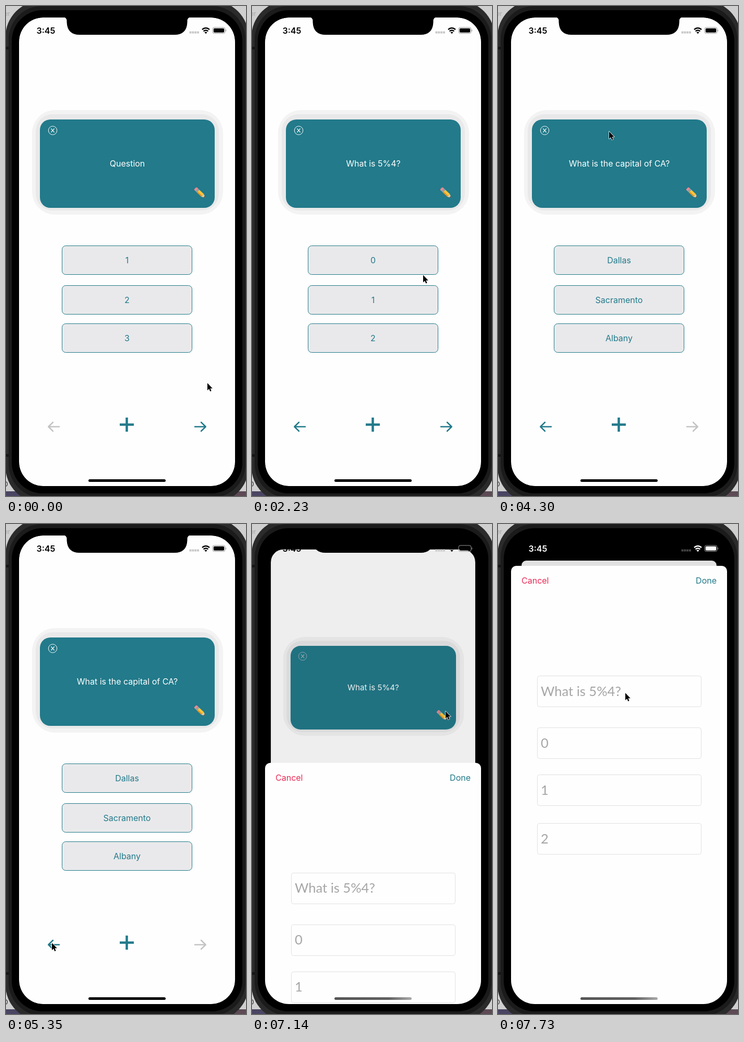
Animation, 460 px wide and 937 px high, one loop 8 s. Source, as an HTML page:

```html
<!DOCTYPE html>
<html lang="en">
<head>
<meta charset="utf-8">
<title>Flashcards</title>
<style>
  html, body { margin: 0; width: 100%; height: 100%; overflow: hidden; background: #cfcfcf; }
  svg { display: block; width: 100%; height: 100%; --teal: #227a8a; }
  text { font: 16px Inter, "Liberation Sans", sans-serif; }
  .mid { text-anchor: middle; }
  .teal { fill: var(--teal); }
  .line { fill: none; stroke: var(--teal); stroke-width: 2.5; stroke-linecap: round; stroke-linejoin: round; }
  .option { fill: #e9e9eb; stroke: var(--teal); }
  .field { fill: #fefefe; stroke: #e1e1e1; }
  .hint { font: 25.5px Lato, "Open Sans", sans-serif; fill: #a6a6a6; }
  #time { font-weight: 600; }
</style>
</head>
<body>
<svg viewBox="0 0 460 937">
  <defs>
    <clipPath id="screen"><rect x="25" y="22" width="414" height="896" rx="46"/></clipPath>
    <clipPath id="pageClip"><rect id="pageRect" x="25" y="22" width="414" height="896"/></clipPath>
    <linearGradient id="barFade">
      <stop offset="0" stop-color="#555"/>
      <stop offset=".7" stop-color="#606060"/>
      <stop offset="1" stop-color="#aaa"/>
    </linearGradient>
  </defs>

  <!-- desktop and phone body -->
  <rect width="460" height="937" fill="#cfcfcf"/>
  <text x="-3" y="19" style="font-size:11px" fill="#a5a5a5">er</text>
  <text x="-6" y="919" style="font-size:13px" fill="#333">O</text>
  <rect y="928" width="230" height="9" fill="#4a4562"/>
  <rect x="230" y="928" width="230" height="9" fill="#5d4a55"/>
  <rect x="-1" y="-10" width="466" height="960" rx="69" fill="#2b2b2b"/>
  <rect x="5" y="0" width="454" height="940" rx="64" fill="#1b1b1b"/>
  <path d="M0 78h5v5H0zM0 857h5v5H0z" fill="#151515"/>
  <rect x="11" y="8" width="442" height="924" rx="59"/>

  <g clip-path="url(#screen)">
    <g id="page"><g clip-path="url(#pageClip)">
      <rect x="25" y="22" width="414" height="896" fill="#fefefe"/>
      <rect x="50" y="199" width="366" height="200" rx="44" fill="#f3f3f3"/>
      <rect x="57" y="207" width="351" height="184" rx="32" fill="#e9e9ea"/>
      <rect id="card" x="65" y="217" width="335" height="169" rx="20"/>
      <g id="close" fill="none" stroke="#fff">
        <circle cx="89.5" cy="238" r="8.2"/>
        <path d="M86.4 234.4l6.2 7.2m0-7.2l-6.2 7.2" stroke-width="1.3"/>
      </g>
      <text id="label" class="mid" x="232.5" y="307"/>
      <g transform="translate(363.5 349.5) rotate(43.5)">
        <path d="M0-3.5H3.5V3.5H0Q-1.5 3.5-1.5 0T0-3.5" fill="#e58a92"/>
        <path d="M3.5-3.5h3v7h-3z" fill="#98a2a8"/>
        <path d="M6.5-3.5h12v7h-12z" fill="#f8c63d"/>
        <path d="M6.5 1.2h12v2.3h-12z" fill="#e0922b"/>
        <path d="M18.5-3.5L25 0 18.5 3.5z" fill="#eccb9f"/>
        <path d="M22.2-1.5L25 0 22.2 1.5z" fill="#444"/>
      </g>
      <g id="options"></g>
      <path id="prev" class="line" d="M102 804.5H81.5M90 796l-8.7 8.5 8.7 8.5"/>
      <path id="next" class="line" d="M362 804.5h20.5M374 796l8.7 8.5-8.7 8.5"/>
      <path d="M218 800.5h27M231.5 787v27" stroke="#227a8a" stroke-width="4.5"/>
    </g></g>
    <rect id="dim" width="460" height="937"/>
    <g id="sheet">
      <rect x="25" y="80" width="414" height="900" rx="10" fill="#fefefe"/>
      <text x="45" y="114" fill="#ee2a55">Cancel</text>
      <text class="teal" x="419" y="114" text-anchor="end">Done</text>
      <g id="fields"></g>
    </g>
    <rect id="homeBar" x="158" y="905" width="148" height="5" rx="2.5"/>
  </g>

  <path d="M108 21Q116.500 21 116.500 29V31Q117.500 55 141 55H323Q346.500 55 347.500 31V29Q347.500 21 356 21Z"/>
  <g id="status">
    <text id="time" x="58.500" y="53">3:45</text>
    <path id="dots" d="M351.500 50.500h18.500" stroke-width="4" stroke-dasharray="4 .83" fill="none"/>
    <path d="M376 45q7-6 14 0M378.600 48.200q4.400-3.600 8.800 0" fill="none" stroke="currentColor" stroke-width="2.400"/>
    <path d="M380.300 50.400q2.700-2 5.400 0L383 53z" fill="currentColor"/>
    <rect x="396" y="41" width="24" height="11.500" rx="3.300" fill="none" stroke="#999"/>
    <rect x="397.800" y="42.700" width="20.400" height="8.100" rx="1.800" fill="currentColor"/>
    <path d="M421.300 45q1.500 1.800 0 3.600z" fill="#999" stroke="#999" stroke-width=".5"/>
  </g>

  <path id="cursor" d="M0 0V14L3.200 11 5.300 15.900 7.600 14.900 5.500 10.200H9.800Z" stroke="#fff" stroke-width="1.500" paint-order="stroke" stroke-linejoin="round"/>
</svg>

<script>
const LOOP = 8000, TICK = 148.6, TEAL = '#227a8a', GREY = '#c3c3c3';
const SHEET_START = 7032, SPRING = 18.3;

const cards = [
  { ask: 'Question', answer: '2', options: ['1', '2', '3'] },
  { ask: 'What is 5%4?', answer: '1', options: ['0', '1', '2'] },
  { ask: 'What is the capital of CA?', answer: 'Sacramento', options: ['Dallas', 'Sacramento', 'Albany'] }
];

// [tick, card, answer side up]
const taps = [
  [0, 0, false], [5, 1, false], [9, 1, true], [14, 1, false],
  [18, 2, false], [24, 2, true], [29, 2, false], [37, 1, false]
];

// [tick, x, y] of the pointer
const route = [
  [1, 385, 720], [3, 376, 797], [4, 372, 802], [5, 370, 795], [7, 284, 337],
  [14, 284, 337], [16, 370, 690], [17, 382, 801], [18, 378, 800], [19, 362, 735],
  [21, 207, 247], [22, 212, 239], [29, 212, 239], [31, 180, 400], [33, 112, 710],
  [35, 86, 799], [37, 88, 801], [39, 98, 780], [40, 125, 695], [42, 174, 386],
  [43, 182, 358], [44, 235, 359], [45, 335, 357], [46, 370, 357], [50, 370, 357],
  [51, 292, 343], [52, 243, 322]
];

const $ = id => document.getElementById(id);
const set = (el, attrs) => { for (const k in attrs) el.setAttribute(k, attrs[k]); };
const mix = (a, b, p) => a + (b - a) * p;

function add(parent, tag, attrs, text = '') {
  const el = document.createElementNS('http://www.w3.org/2000/svg', tag);
  set(el, attrs);
  el.textContent = text;
  return parent.appendChild(el);
}

const optionTexts = [458.5, 534.5, 607.5].map(y => {
  add($('options'), 'rect', { class: 'option', x: 107.5, y, width: 249, height: 55, rx: 7 });
  return add($('options'), 'text', { class: 'mid teal', x: 232, y: y + 33 });
});

[cards[1].ask, ...cards[1].options].forEach((text, i) => {
  const y = [290.5, 389.5, 479.5, 572.5][i];
  add($('fields'), 'rect', { class: 'field', x: 75.5, y, width: 314, height: 59, rx: 4 });
  add($('fields'), 'text', { class: 'hint', x: 82, y: y + 38 }, text);
});

function pointerAt(tick) {
  const i = route.findIndex(k => k[0] > tick);
  if (i === 0) return route[0].slice(1);
  if (i < 0) return route[route.length - 1].slice(1);
  const [a, x0, y0] = route[i - 1], [b, x1, y1] = route[i];
  const p = (tick - a) / (b - a);
  return [mix(x0, x1, p), mix(y0, y1, p)];
}

function sheetProgress(ms) {
  const u = SPRING * Math.max(0, ms - SHEET_START) / 1000;
  return 1 - (1 + u) * Math.exp(-u);
}

function drawCard(tick, sheetUp) {
  const [, index, flipped] = taps.filter(s => s[0] <= tick).pop();
  const { ask, answer, options } = cards[index];
  set($('card'), { fill: flipped ? '#fefefe' : TEAL });
  set($('label'), { fill: flipped ? TEAL : '#fff' });
  $('label').textContent = flipped ? answer : ask;
  optionTexts.forEach((el, i) => { el.textContent = options[i]; });
  set($('close'), { stroke: sheetUp ? '#9fb0b4' : '#fff', visibility: flipped ? 'hidden' : 'visible' });
  $('prev').style.stroke = sheetUp || index === 0 ? GREY : TEAL;
  $('next').style.stroke = sheetUp || index === 2 ? GREY : TEAL;
}

function drawSheet(p) {
  set($('page'), { transform: `translate(232 ${22 + 48 * p}) scale(${1 - 0.097 * p}) translate(-232 -22)` });
  set($('pageRect'), { rx: mix(46, 10, p) });
  set($('dim'), { opacity: 0.115 * p });
  set($('sheet'), { transform: `translate(0 ${mix(838, 0, p)})` });
  set($('homeBar'), { fill: p > 0.3 ? 'url(#barFade)' : '#000' });
  const light = p > 0.8;
  $('status').style.color = light ? '#fff' : '#000';
  set($('time'), { fill: light ? '#fff' : '#000' });
  set($('dots'), { stroke: light ? '#444' : '#c8c8c8' });
}

function draw(now) {
  const tick = Math.floor((now % LOOP + 10) / TICK);
  const p = sheetProgress(tick * TICK);
  const [x, y] = pointerAt(tick);
  drawCard(tick, p > 0);
  drawSheet(p);
  set($('cursor'), { transform: `translate(${x + 1} ${y + 1})` });
}

const start = performance.now();
function loop() {
  draw(performance.now() - start);
  requestAnimationFrame(loop);
}
loop();
</script>
</body>
</html>
```
